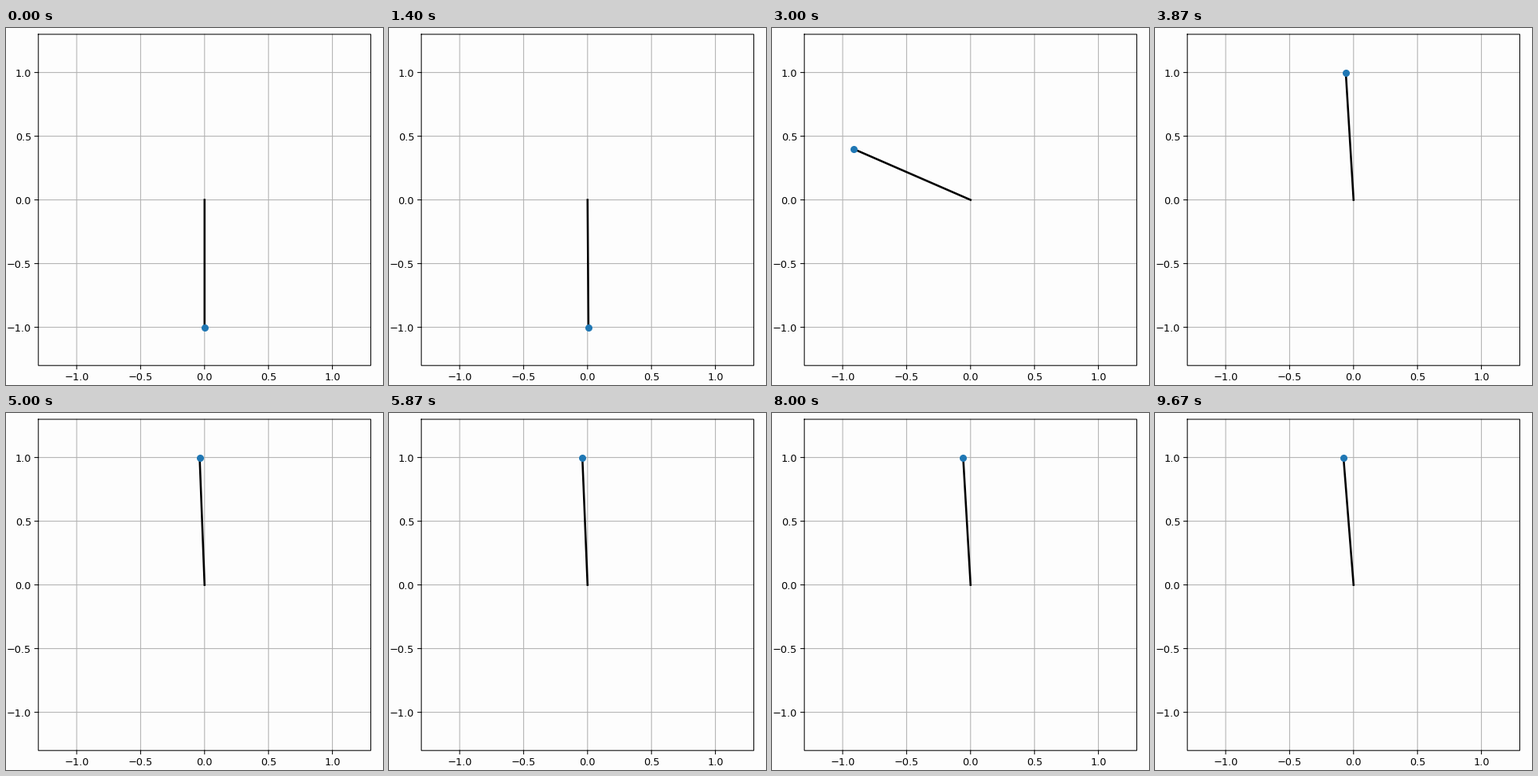
A matplotlib script that plays this animation: 480x454 px, repeating every 9.74 s.

```python
import matplotlib.pyplot as plt
import numpy as np
from matplotlib.animation import FuncAnimation

W, H, DPI = 480, 454, 100
LOOP_MS, TICK_MS = 9740, 20
X0, Y0 = 252.8, 218.6        # pixel position of the pivot
SX, SY = 162.8, 162          # pixels per data unit
LIMIT = 1.3
SCALE = 0.93                 # plot elements relative to their default size
LABEL_SIZE = 10 * SCALE
THIN = 0.8 * SCALE
TICK_LEN, LABEL_PAD = 4.5, 9

# Swing-up: step, angle from hanging (degrees, left positive), angle per step
SWING = [(0, 0, 0), (8.6, 32, 0), (12, -0.4, -14), (19.4, -70, 0),
         (24, 0, 28), (29, 113.6, 14.5), (40, 177.8, 0)]
DRIFT_START, LAST_STEP, DRIFT = 50, 99, 2.3


def px(x):
    return X0 + SX * x


def py(y):
    return Y0 - SY * y


def angle_at(step):
    """Cubic swings up to the balance point, then a slow fall to the left."""
    for (s0, a0, v0), (s1, a1, v1) in zip(SWING, SWING[1:]):
        if step < s1:
            h = s1 - s0
            u = (step - s0) / h
            ease = u * u * (3 - 2 * u)
            return (a0 + (a1 - a0) * ease
                    + h * u * (1 - u) * (v0 * (1 - u) - v1 * u))
    u = max(0, step - DRIFT_START) / (LAST_STEP - DRIFT_START)
    return SWING[-1][1] - DRIFT * u ** 1.7


def step_at(tick):
    """The picture refreshes 15 times a second, the pendulum 10.5 times."""
    refresh = tick * TICK_MS * 15 // 1000
    return max(0, (refresh - 4) * 7 // 10 + 1)


def line(xs, ys, color="black", width=THIN, **kw):
    return ax.plot(xs, ys, color=color, lw=width, snap=False, **kw)[0]


def draw_plot_area():
    left, right = px(-LIMIT), px(LIMIT)
    top, bottom = py(LIMIT), py(-LIMIT)
    font = dict(fontsize=LABEL_SIZE, family="DejaVu Sans", color="black")
    for v in np.arange(-1, 1.5, 0.5):
        x, y = px(v), py(v)
        label = f"{v:.1f}".replace("-", "\u2212")
        line([x, x], [top, bottom], "#b0b0b0")
        line([left, right], [y, y], "#b0b0b0")
        line([x, x], [bottom, bottom + TICK_LEN])
        line([left - TICK_LEN, left], [y, y])
        ax.text(x, bottom + LABEL_PAD, label, ha="center", va="top", **font)
        ax.text(left - LABEL_PAD, y, label, ha="right",
                va="center_baseline", **font)
    line([left, right, right, left, left], [top, top, bottom, bottom, top],
         zorder=2.5, solid_joinstyle="miter")


fig = plt.figure(figsize=(W / DPI, H / DPI), dpi=DPI, facecolor="#fdfdfd")
ax = fig.add_axes([0, 0, 1, 1])
ax.set_xlim(0, W)
ax.set_ylim(H, 0)
ax.set_axis_off()

draw_plot_area()
rod = line([], [], width=2 * SCALE, zorder=3)
bob = line([], [], "#1f77b4", marker="o", ms=6 * SCALE, mew=SCALE, zorder=4)


def update(tick):
    a = np.radians(angle_at(step_at(tick)))
    x, y = px(-np.sin(a)), py(-np.cos(a))
    rod.set_data([px(0), x], [py(0), y])
    bob.set_data([x], [y])
    return rod, bob


anim = FuncAnimation(fig, update, frames=LOOP_MS // TICK_MS,
                     interval=TICK_MS, repeat=True, repeat_delay=0)
plt.show()
```
